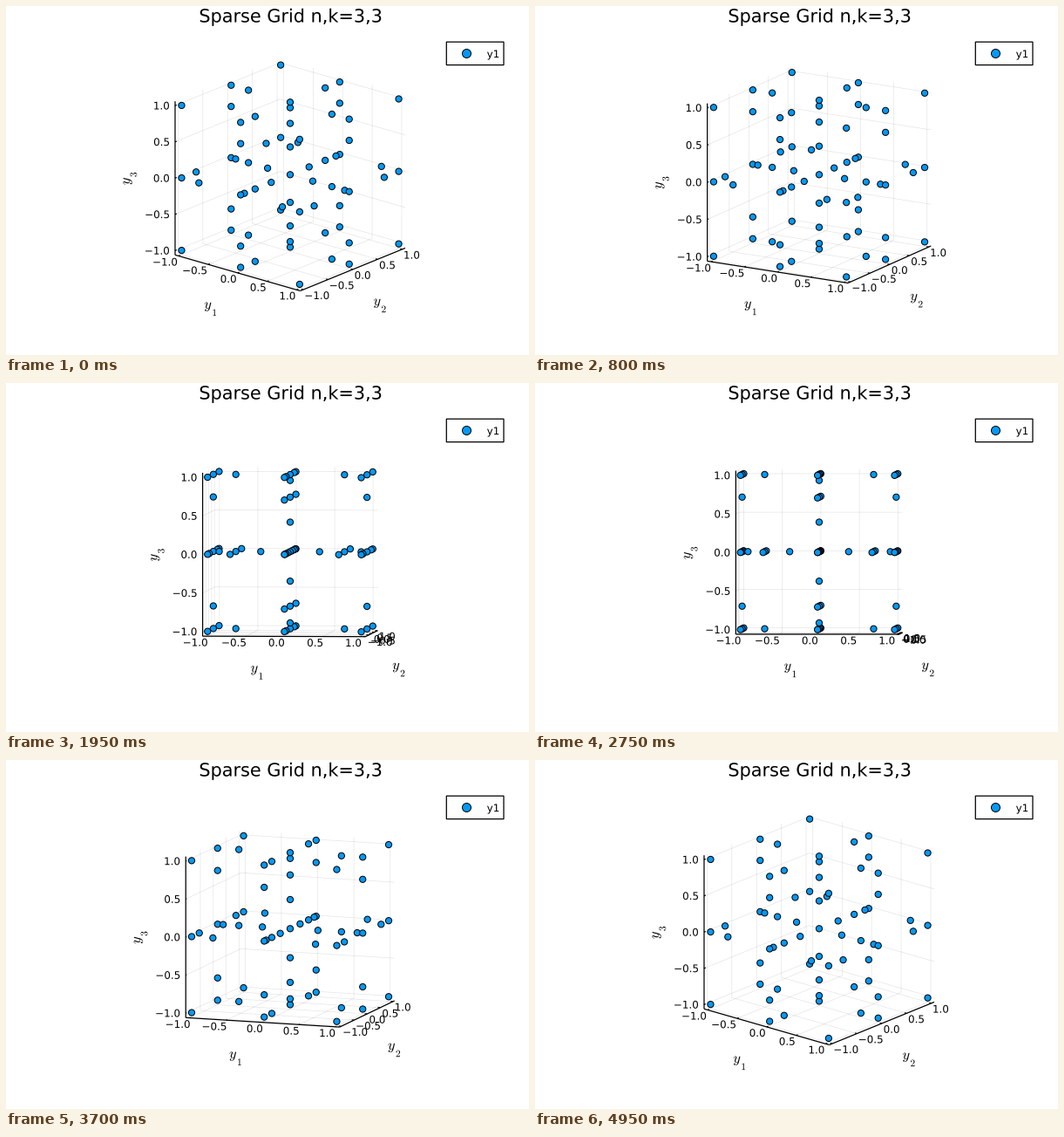
Animation of 600x400 px, one loop 5000 ms. Source, as a matplotlib script:

```python
import itertools

import matplotlib.pyplot as plt
import numpy as np
from matplotlib.animation import FuncAnimation
from matplotlib.collections import EllipseCollection, LineCollection
from matplotlib.patches import Circle, PathPatch, Rectangle
from matplotlib.path import Path
from matplotlib.textpath import TextPath
from matplotlib.transforms import Affine2D

W, H, DPI = 600, 400, 100
FRAMES, INTERVAL = 100, 50
PX = 72 / DPI                      # points per pixel
CENTER = np.array([326, 206.7])
SCALE = 88.4
LIM = 1.06
TICKS = np.linspace(-1, 1, 5)
BLUE = "#009AFA"
TITLE_SIZE, TICK_SIZE, GUIDE_SIZE = 20.8, 11.9, 16.3
LABEL_GAP = 7

plt.rcParams["mathtext.fontset"] = "cm"


def sparse_grid(dims, level):
    """Smolyak grid built from nested Chebyshev points."""
    nested = [[0.0], [-1.0, 1.0]]
    for k in range(2, level + 1):
        odd = np.arange(1, 2 ** k, 2)
        nested.append(list(-np.cos(np.pi * odd / 2 ** k)))
    points = []
    for levels in itertools.product(range(level + 1), repeat=dims):
        if sum(levels) <= level:
            points += itertools.product(*(nested[k] for k in levels))
    return np.array(points)


def grid_lines(axis, t):
    """Corner points of one grid line: on the axis, across, then along."""
    if axis == 0:
        return [(t, -LIM, -LIM), (t, LIM, -LIM), (t, LIM, LIM)]
    if axis == 1:
        return [(LIM, t, -LIM), (-LIM, t, -LIM), (-LIM, t, LIM)]
    return [(-LIM, -LIM, t), (-LIM, LIM, t), (LIM, LIM, t)]


def camera(frame):
    swing = (1 + np.cos(2 * np.pi * frame / (FRAMES - 1))) / 2
    az, el = np.radians(40 * swing), np.radians(20 * swing)
    right = np.array([np.cos(az), np.sin(az), 0])
    up = np.array([-np.sin(az) * np.sin(el), np.cos(az) * np.sin(el), np.cos(el)])
    return right, up


def project(points, right, up):
    points = np.asarray(points)
    return CENTER + SCALE * np.stack([points @ right, points @ up], axis=-1)


def text_path(text, size, align):
    """Glyph outline aligned by its ink in x and by cap height in y."""
    path = TextPath((0, 0), text, size=size, prop={"family": "DejaVu Sans"})
    box = path.get_extents()
    x = {"left": box.x0, "center": (box.x0 + box.x1) / 2, "right": box.x1}[align]
    return Affine2D().translate(-x, -0.3645 * size).transform_path(path)


def guide_path(digit, angle=0):
    """Centred math label y with a subscript."""
    base = TextPath((0, 0), "$y$", size=GUIDE_SIZE)
    sub = TextPath((0.55 * GUIDE_SIZE, -0.51 * GUIDE_SIZE), f"${digit}$",
                   size=0.7 * GUIDE_SIZE)
    path = Path.make_compound_path(base, sub)
    box = path.get_extents()
    move = Affine2D().translate(-(box.x0 + box.x1) / 2, -(box.y0 + box.y1) / 2)
    return move.rotate_deg(angle).transform_path(path)


fig = plt.figure(figsize=(W / DPI, H / DPI), dpi=DPI, facecolor="white")
ax = fig.add_axes([0, 0, 1, 1])
ax.set_xlim(0, W)
ax.set_ylim(0, H)
ax.axis("off")


def place(patch, xy):
    patch.set_transform(Affine2D().translate(*xy) + ax.transData)


def add_text(path, xy=(0, 0)):
    patch = PathPatch(path, facecolor="black", linewidth=0, zorder=4)
    ax.add_patch(patch)
    place(patch, xy)
    return patch


def add_lines(width, alpha, zorder):
    lines = LineCollection([], colors=[(0, 0, 0, alpha)], linewidths=width * PX,
                           zorder=zorder)
    lines.set_snap(False)
    ax.add_collection(lines, autolim=False)
    return lines


points = sparse_grid(3, 3)
grid = np.array([grid_lines(k, t) for k in range(3) for t in TICKS])
marks = np.stack([grid[:, 0], grid[:, 0] + 0.015 * (grid[:, 1] - grid[:, 0])], axis=1)
edges = np.array([[grid_lines(k, t)[0] for t in (-LIM, LIM)] for k in range(3)])

grid_art = add_lines(0.7, 0.1, 1)
axis_art = add_lines(1.25, 1, 2)
size = np.full(len(points), 7.2)
dots = EllipseCollection(size, size, np.zeros(len(points)), units="xy",
                         offsets=np.zeros((len(points), 2)),
                         offset_transform=ax.transData, facecolors=BLUE,
                         edgecolors="black", linewidths=1.0 * PX, zorder=5)
ax.add_collection(dots, autolim=False)

tick_names = [f"{t:.1f}".replace("-", "\u2212") for t in TICKS]
tick_art = [[add_text(text_path(name, TICK_SIZE, align)) for name in tick_names]
            for align in ("right", "left", "right")]
guide_art = [add_text(guide_path(1)), add_text(guide_path(2)),
             add_text(guide_path(3, 90))]
guide_shift = [(-31.3, -41.4), (31, -41.4), (-51.7, -0.5)]

# Title and legend
add_text(text_path("Sparse Grid n,k=3,3", TITLE_SIZE, "center"), (326.5, 389))
ax.add_patch(Rectangle((505.3, 332.4), 65.7, 26.4, facecolor="white",
                       edgecolor="black", linewidth=1.25 * PX, snap=False, zorder=3))
ax.add_patch(Circle((528.5, 345.5), 5, facecolor=BLUE, edgecolor="black",
                    linewidth=1.0 * PX, zorder=5))
add_text(text_path("y1", TICK_SIZE, "left"), (552, 345.2))


def draw(frame):
    right, up = camera(frame)
    near = points @ np.cross(right, up)
    dots.set_offsets(project(points[np.argsort(near, kind="stable")], right, up))

    grid_art.set_segments(project(grid, right, up))
    ends = project(edges, right, up)
    tips = project(marks, right, up)
    axis_art.set_segments(np.concatenate([ends, tips]))

    for k in range(3):
        dx, dy = (ends[k, 1] - ends[k, 0]) / np.linalg.norm(ends[k, 1] - ends[k, 0])
        side = -1 if k == 2 else 1
        gap = side * LABEL_GAP * np.array([dy, -dx])
        for j, patch in enumerate(tick_art[k]):
            place(patch, tips[k * len(TICKS) + j, 0] + gap)
        place(guide_art[k], ends[k].mean(axis=0) + guide_shift[k])
    return []


anim = FuncAnimation(fig, draw, frames=FRAMES, interval=INTERVAL, repeat=True,
                     repeat_delay=0, blit=False)
plt.show()
```
